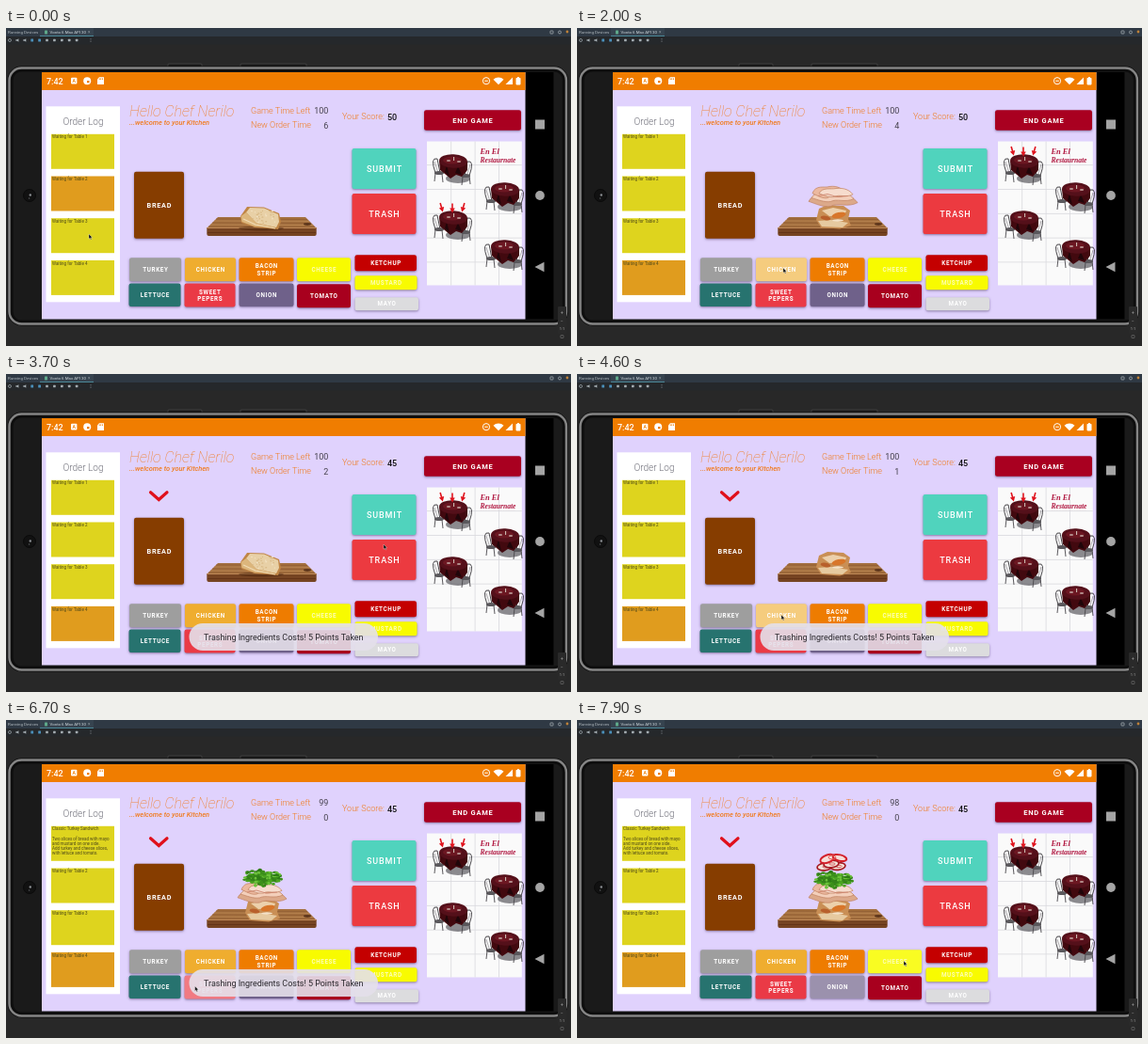
An HTML page with a canvas that plays this animation: 600 by 338 pixels, repeating every 8 s.

```html
<!DOCTYPE html>
<html lang="en">
<head>
<meta charset="utf-8">
<title>Kitchen game</title>
<style>
html, body { margin: 0; width: 100%; height: 100%; overflow: hidden; background: #282828; }
canvas { display: block; width: 600px; height: 338px; }
</style>
</head>
<body>
<canvas id="stage"></canvas>
<script>
const LOOP = 8000;
const TRASHED = 3050;
const canvas = document.getElementById('stage');
const c = canvas.getContext('2d');
const ratio = window.devicePixelRatio || 1;
canvas.width = 600 * ratio;
canvas.height = 338 * ratio;

// ---------- helpers ----------
function rect(x, y, w, h, fill) {
  c.fillStyle = fill;
  c.fillRect(x, y, w, h);
}
function round(x, y, w, h, r, fill, line, width = 1) {
  c.beginPath();
  c.roundRect(x, y, w, h, r);
  if (fill) { c.fillStyle = fill; c.fill(); }
  if (line) { c.strokeStyle = line; c.lineWidth = width; c.stroke(); }
}
function oval(x, y, rx, ry, fill, line, width = 1, turn = 0) {
  c.beginPath();
  c.ellipse(x, y, rx, ry, turn, 0, Math.PI * 2);
  if (fill) { c.fillStyle = fill; c.fill(); }
  if (line) { c.strokeStyle = line; c.lineWidth = width; c.stroke(); }
}
function shape(points, fill, line, width = 1, open = false) {
  c.beginPath();
  for (let i = 0; i < points.length; i += 2) c.lineTo(points[i], points[i + 1]);
  if (!open) c.closePath();
  if (fill) { c.fillStyle = fill; c.fill(); }
  if (line) { c.strokeStyle = line; c.lineWidth = width; c.stroke(); }
}
function text(str, x, y, size, color, o = {}) {
  c.font = `${o.style || ''} ${o.weight || 400} ${size}px ${o.family || 'Roboto, sans-serif'}`;
  c.letterSpacing = (o.gap || 0) + 'px';
  c.textAlign = o.align || 'left';
  c.fillStyle = color;
  c.fillText(str, x + (o.align === 'center' ? (o.gap || 0) / 2 : 0), y);
}
function mix(a, b, k) {
  const part = (s, i) => parseInt(s.slice(i, i + 2), 16);
  const v = [1, 3, 5].map(i => Math.round(part(a, i) + (part(b, i) - part(a, i)) * k));
  return `rgb(${v})`;
}
const clamp = v => Math.max(0, Math.min(1, v));
const ease = k => k * k * (3 - 2 * k);
function noise(seed) {
  return () => (seed = (seed * 16807) % 2147483647) / 2147483647;
}

// ---------- window and phone ----------
function drawWindow() {
  rect(0, 0, 600, 338, '#282828');
  rect(0, 0, 600, 9, '#2f3944');
  rect(36, 0, 57, 9, '#36434f');
  rect(36, 8, 57, 1, '#4a8797');
  rect(0, 9, 600, 8.5, '#25282b');
  text('Running Devices', 2, 6, 4.4, '#b4bcc2');
  round(41, 2.5, 3, 4, .6, '#5fa98a');
  text('Vonto 6 Max API 30', 46.5, 6, 4.4, '#cbd3d8');
  text('×', 87, 6, 4.6, '#9aa4a9');
  for (let i = 0; i < 11; i++) {
    const x = 4 + i * 7.9;
    if (i === 0) oval(x, 13, 1.5, 1.5, null, '#a4adb2', .7);
    else if (i === 3 || i === 4) round(x - 1.4, 11.6, 2.8, 2.8, .5, '#4b8fba');
    else if (i === 1 || i === 2) shape([x - 1.5, 12.3, x, 12.3, x + 1.5, 11.2, x + 1.5, 14.8, x, 13.7, x - 1.5, 13.7], '#a4adb2');
    else if (i === 10) for (let k = 0; k < 3; k++) oval(x + 7, 11.5 + k * 1.5, .45, .45, '#a4adb2');
    else round(x - 1.3, 11.7, 2.6, 2.6, .5, '#a4adb2');
  }
  round(578, 3, 3, 3, .4, null, '#a4adb2', .8);
  oval(588, 4.5, 1.5, 1.5, null, '#a4adb2', .8);
  oval(596, 4, 1.4, 1.4, '#c08238');

  round(172, 38, 36, 5, 1, '#1b1b1b', '#4c4c4c', .7);
  round(249, 38, 70, 5, 1, '#1b1b1b', '#4c4c4c', .7);
  round(1.5, 40.5, 595.5, 276, 15, '#0e0e0e');
  round(3.5, 42.5, 591.5, 272, 13, '#1a1a1a', '#858585', 2.4);
  round(6.5, 45.3, 585.5, 266.4, 10, null, '#0d0d0d', 2.2);
  rect(551.5, 47, 30, 262.5, '#000');
  oval(25, 178, 6.5, 6.5, '#111', '#0a0a0a', 1);
  oval(25.8, 177.5, 1.2, 1.2, '#8a8e92');
  oval(24.6, 181, .8, .8, '#55595c');

  rect(562, 97.5, 10, 10, '#a4a4a4');
  oval(567, 178, 4.9, 4.9, '#a4a4a4');
  shape([561.5, 254, 571.5, 248.8, 571.5, 259.2], '#a4a4a4');

  round(586, 296, 9, 29, 1, '#2a2a2a');
  text('+', 590.5, 304, 5, '#a9a9a9', { align: 'center' });
  text('−', 590.5, 313, 5, '#a9a9a9', { align: 'center' });
  text('1:1', 590.5, 321, 4, '#a9a9a9', { align: 'center' });
  round(589, 326.5, 3, 3, .3, null, '#777', .6);
}

function drawStatus() {
  rect(38, 47, 513.5, 262.5, '#e0d2fd');
  rect(38, 47, 513.5, 19, '#f07d00');
  text('7:42', 43, 60, 9, '#fff', { weight: 500 });
  round(69, 52.8, 6.4, 6.6, 1, '#fff');
  text('A', 72.2, 58.2, 5, '#f07d00', { weight: 700, align: 'center' });
  oval(86.2, 56.2, 4, 4, '#fff');
  rect(86, 56, 2.5, 2.3, '#f07d00');
  shape([97, 54.5, 99, 52.3, 104, 52.3, 104, 60, 97, 60], '#fff');
  for (let i = 0; i < 3; i++) rect(98.8 + i * 1.6, 53.4, .8, 1.6, '#f07d00');
  oval(510, 56.2, 3.6, 3.6, null, '#fff', 1);
  rect(508.2, 55.7, 3.6, 1, '#fff');
  c.beginPath();
  c.moveTo(523, 60.2);
  c.arc(523, 60.2, 7.8, Math.PI * 1.25, Math.PI * 1.75);
  c.fillStyle = '#fff';
  c.fill();
  shape([530.5, 60, 538, 60, 538, 52.4], '#fff');
  round(541.5, 53, 5, 7.4, .8, '#fff');
  rect(543, 52, 2, 1.5, '#fff');
}

// ---------- app ----------
const recipe = ['Classic Turkey Sandwich', '', 'Two slices of bread with mayo',
  'and mustard on one side.', 'Add turkey and cheese slices,', 'with lettuce and tomato.'];

function drawOrders(t) {
  const chosen = t < 200 ? 2 : t < 550 ? 3 : 4;
  rect(42.5, 83.3, 78.5, 208, '#ffffff');
  text('Order Log', 82, 102.6, 10, '#70707a', { weight: 300, align: 'center' });
  for (let n = 1; n <= 4; n++) {
    const y = 112.8 + (n - 1) * 44.7;
    rect(48, y, 67, 37, n === chosen ? '#e09c1e' : '#ded41e');
    if (n === 1 && t >= 6400) {
      recipe.forEach((line, i) => text(line, 49, y + 4.6 + i * 5.15, 4.5, '#4c4718'));
    } else {
      text('Waiting for Table ' + n, 49, y + 4.6, 4.5, '#4c4718');
    }
  }
  return chosen;
}

function drawHeader(t) {
  const ticks = Math.max(0, Math.floor((t + 600) / 1000));
  const orange = '#f07a1c';
  text('Hello Chef Nerilo', 131, 94.2, 16, orange, { weight: 100, style: 'italic' });
  text('...welcome to your Kitchen', 131, 102.5, 7.4, orange, { weight: 500, style: 'italic' });
  text('Game Time Left', 260, 91, 9, orange, { weight: 300 });
  text('New Order Time', 260, 106, 9, orange, { weight: 300 });
  text('Your Score:', 357, 97.3, 9, orange, { weight: 300 });
  text(100 - Math.max(0, ticks - 6), 342.3, 91.2, 9, '#46424e', { align: 'right' });
  text(Math.max(0, 6 - ticks), 342.3, 106.7, 9, '#46424e', { align: 'right' });
  text(t < TRASHED ? 50 : 45, 405, 97.5, 9, '#111', { weight: 500 });
}

const buttons = [
  // label, x, y, width, height, colour, type size
  ['END GAME', 444, 87.3, 103, 21.5, '#a90020', 7.5],
  ['SUBMIT', 367.5, 128, 68, 43, '#50d3bd', 9],
  ['TRASH', 367.5, 176, 68, 43, '#ec3a40', 9],
  ['BREAD', 136, 152.8, 53, 71, '#863d00', 7.3],
  ['TURKEY', 131, 244.3, 55, 25, '#9e9e9e', 6.3],
  ['CHICKEN', 190, 244.3, 54, 25, '#efad2f', 6.3],
  ['BACON STRIP', 247.5, 244.3, 58, 25, '#ee7c00', 6.3],
  ['CHEESE', 309, 244.3, 57, 25, '#f8fb00', 6.3],
  ['LETTUCE', 130.5, 271.5, 55, 24.5, '#27736f', 6.3],
  ['SWEET PEPERS', 189.5, 271.5, 54, 25, '#ea3a46', 6.3],
  ['ONION', 247.5, 271.5, 58, 24.5, '#6f618a', 6.3],
  ['TOMATO', 309, 272.3, 57, 25, '#a8001e', 6.3],
  ['KETCHUP', 370.5, 241.3, 65.5, 17, '#c40000', 6.3],
  ['MUSTARD', 370.5, 263.3, 66, 15, '#f8fb00', 6.3],
  ['MAYO', 370.5, 286.2, 67.5, 14, '#dcdcde', 6.3]
];
const presses = [['TURKEY', 1250], ['CHICKEN', 1900], ['TRASH', TRASHED - 50], ['CHICKEN', 4450],
  ['TURKEY', 5100], ['LETTUCE', 5500], ['SWEET PEPERS', 6650], ['ONION', 7450], ['CHEESE', 7880]];

function glow(label, t) {
  let g = 0;
  for (const [name, at] of presses) {
    const age = t - at;
    if (name === label && age >= 0) g = Math.max(g, Math.min(age / 60, 1) * clamp((650 - age) / 250) * .38);
  }
  return g;
}
function drawButtons(t) {
  for (const [label, x, y, w, h, color, size] of buttons) {
    c.save();
    c.shadowColor = 'rgba(50,30,80,.5)';
    c.shadowBlur = 2.5 * ratio;
    c.shadowOffsetY = 1 * ratio;
    round(x, y, w, h, 2.2, mix(color, '#ffffff', glow(label, t)));
    c.restore();
    const lines = size === 6.3 ? label.split(' ') : [label];
    const o = { weight: size === 9 ? 500 : 700, gap: size / 10, align: 'center' };
    const ink = color === '#f8fb00' ? '#fdfdb8' : '#ffffff';
    lines.forEach((line, i) => {
      const dy = (i - (lines.length - 1) / 2) * 7.4;
      text(line, x + w / 2, y + h / 2 + size * .36 + dy, size, ink, o);
    });
  }
}

// ---------- restaurant ----------
const tables = [[528, 240], [473, 209], [528, 179], [473, 149]];

function chair(x, y, dir) {
  const ink = '#4a484c';
  c.beginPath();
  c.moveTo(x, y + 4);
  c.quadraticCurveTo(x - dir * 6, y - 13, x + dir * 2, y - 11);
  c.lineTo(x + dir * 5, y + 4);
  c.strokeStyle = ink;
  c.lineWidth = 1;
  c.stroke();
  shape([x - dir, y - 8, x + dir * 2.5, y + 3], null, '#77757a', .6, true);
  oval(x + dir * 4, y + 4, 5, 2, '#5a585c');
  shape([x, y + 4, x - dir, y + 13], null, ink, .9, true);
  shape([x + dir * 7, y + 5, x + dir * 8, y + 14], null, ink, .9, true);
}
function drawTable(x, y) {
  oval(x + 7, y + 11, 13, 5, 'rgba(80,78,84,.65)');
  chair(x - 17, y + 1, 1);
  chair(x + 19, y + 4, -1);
  const cx = x + 2, cy = y - 2;
  shape([cx - 15, cy - 6, cx + 15, cy - 5, cx + 15, cy + 4, cx + 9, cy + 11, cx + 3, cy + 9,
    cx - 3, cy + 13, cx - 9, cy + 8, cx - 14, cy + 4], '#42090f');
  shape([cx - 7, cy - 1, cx - 4, cy + 11, cx - 9, cy + 6], '#20060a');
  shape([cx + 5, cy, cx + 9, cy + 9, cx + 2, cy + 7], '#20060a');
  oval(cx, cy - 5.5, 15, 7.3, '#54101a', null, 1, .05);
  oval(cx - 1, cy - 6.5, 10, 4, '#6c1722');
  oval(cx - 5, cy - 6, 2.2, .9, '#b59390');
  oval(cx + 6, cy - 5, 2.2, .9, '#b59390');
  rect(cx, cy - 10, 1.1, 4, '#c9b8ae');
}
function arrow(x, y, turn) {
  c.save();
  c.translate(x, y);
  c.rotate(turn);
  shape([-.8, -5, .8, -5, .8, 0, 2.8, 0, 0, 5, -2.8, 0, -.8, 0], '#e0141e');
  c.restore();
}
function drawRestaurant(chosen) {
  rect(447, 120.5, 100.8, 153, '#fafafa');
  for (let i = 0; i < 3; i++) rect(472.3 + i * 25.4, 120.5, .8, 153, '#d9d9dd');
  for (let i = 0; i < 5; i++) rect(447, 145.3 + i * 25.8, 100.8, .8, '#d9d9dd');
  for (const [x, y] of tables) drawTable(x, y);
  const script = { style: 'italic', weight: 700, family: '"Liberation Serif", serif' };
  text('En El', 503.5, 134, 8.4, '#b01640', script);
  text('Restaurnate', 503.5, 143, 7.6, '#b01640', script);
  const [x, y] = tables[chosen - 1];
  for (let i = -1; i <= 1; i++) arrow(x + 1 + i * 11.5, y - 17.5 - Math.abs(i) * .7, i * .28);
}

// ---------- sandwich ----------
function drawBoard() {
  shape([225, 201, 318, 201, 329.5, 212.5, 213.5, 212.5], '#a4703f');
  for (let i = 0; i < 5; i++) {
    shape([223 - i * 2, 203 + i * 2, 320 + i * 2, 203.5 + i * 2], null, i % 2 ? '#ba8753' : '#8f5b32', .7, true);
  }
  round(213.3, 212, 116.4, 9, [0, 0, 2, 2], '#764422');
  rect(213.3, 212, 116.4, 1, '#c08a58');
  rect(214, 217, 115, .7, '#5c2f14');
  oval(320, 208.5, 4, 1.4, '#5f371c');
}
function drawBread() {
  oval(271, 213, 24, 2.5, 'rgba(60,25,5,.4)');
  shape([249, 200, 256, 190, 274, 190.5, 290, 197, 292, 206, 289, 214, 264, 212, 250, 207], '#c08545');
  shape([255, 196, 259, 191, 274, 191.5, 289, 198, 290, 206, 287, 212, 266, 207.5], '#e8d0a6');
  shape([249.5, 200, 255, 196, 266, 207.5, 287, 212, 264, 211, 250.5, 206], '#dcb67c');
  shape([252, 203, 265, 209, 286, 213], null, '#f1dcb6', 1.1, true);
  const rnd = noise(31);
  for (let i = 0; i < 34; i++) oval(261 + rnd() * 25, 193.5 + rnd() * 14, .5 + rnd() * .8, .5, i % 3 ? '#d2b07a' : '#f6e8cc');
}
function drawChicken(y) {
  shape([257, y - 8, 266, y - 12, 283, y - 11, 290, y - 6, 288, y + 3, 291, y + 10, 279, y + 13.5, 259, y + 12, 254, y + 4], '#c98f55');
  shape([260, y - 6, 272, y - 9, 286, y - 6, 284, y - 1, 268, y], '#ecd0ab');
  shape([256, y + 5, 270, y + 4, 288, y + 7, 282, y + 12, 260, y + 11], '#e6caa0');
  oval(278, y - 1, 7.5, 3, '#d8762a', null, 1, -.2);
  oval(264, y + 2, 5.5, 2.2, '#b8602c', null, 1, .2);
  oval(277, y + 4.5, 6, 1.2, '#f4e2c8');
}
function slice(x, y, w, h, fill) {
  c.beginPath();
  c.moveTo(x, y + h * .6);
  c.bezierCurveTo(x + w * .1, y - h * .2, x + w * .35, y + h * .15, x + w * .5, y);
  c.bezierCurveTo(x + w * .75, y - h * .1, x + w * .9, y + h * .2, x + w, y + h * .7);
  c.bezierCurveTo(x + w * .8, y + h * 1.15, x + w * .6, y + h * .65, x + w * .45, y + h);
  c.bezierCurveTo(x + w * .3, y + h * 1.1, x + w * .15, y + h * .8, x, y + h * .6);
  c.fillStyle = fill;
  c.fill();
  c.strokeStyle = '#c08260';
  c.lineWidth = .7;
  c.stroke();
}
function drawTurkey(y) {
  slice(246, y + 8, 52, 13, '#dca98a');
  slice(249, y + 6, 45, 10, '#f3cfba');
  slice(250, y, 36, 12, '#ecb9a0');
  slice(257, y + 2, 36, 9, '#f6dccd');
  shape([256, y + 10, 266, y + 8, 276, y + 11, 288, y + 10], null, '#cf8670', .9, true);
}
function drawLettuce(y) {
  const rnd = noise(77);
  const greens = ['#2e7d16', '#4aa421', '#6cc23a', '#3c8f1b'];
  oval(271, y + 10, 17, 6, '#35831a');
  for (let i = 0; i < 90; i++) {
    const a = rnd() * Math.PI * 2, r = Math.sqrt(rnd());
    oval(272 + Math.cos(a) * r * 21, y + 9.5 + Math.sin(a) * r * 9, 1.2 + rnd() * 1.5, .8 + rnd(), greens[i % 4]);
  }
}
function drawPeppers(y) {
  for (const [x, d] of [[263, 4], [277, 3.5], [270, 1]]) {
    oval(x, y + d, 8, 3.8, '#f4e3da', '#a51820', 1.7, -.1);
    oval(x + 1, y + d, 3.2, 1.2, null, '#c9464a', .8);
  }
}
function drawRings(y) {
  oval(266, y + 5.5, 8, 4, '#f6dfd8', '#d3202a', 2, -.35);
  oval(279, y + 4.5, 7.5, 3.2, '#f6dfd8', '#d3202a', 2, .25);
  oval(271, y + 4, 4, 2, null, '#e65650', 1);
}
function drawSandwich(t) {
  drawBoard();
  const first = t >= 1300 && t < TRASHED;
  if (t < 1950 || (t >= TRASHED && t < 4500)) drawBread();
  if (first) {
    if (t >= 1950) drawChicken(200);
    drawTurkey(t >= 1950 ? 168.5 : 176);
  }
  if (t >= 4500) drawChicken(201);
  if (t >= 5150) drawTurkey(t >= 5550 ? 173 : 168.5);
  if (t >= 5550) drawLettuce(t >= 6800 ? 160 : 158);
  if (t >= 6800) drawPeppers(152);
  if (t >= 7500) drawRings(142);
}

// ---------- overlays ----------
function drawToast(t) {
  const show = clamp((t - TRASHED - 50) / 250) * clamp((7150 - t) / 250);
  if (!show) return;
  c.save();
  c.globalAlpha = show;
  round(194.5, 265, 200.5, 29, 14.5, 'rgba(229,224,234,.9)');
  text('Trashing Ingredients Costs! 5 Points Taken', 294.8, 282.7, 8.95, '#29272c', { align: 'center' });
  c.restore();
}

const path = [[0, 88, 219], [100, 88, 220], [500, 88, 266], [800, 88, 266], [1200, 158, 255],
  [1450, 158, 255], [1850, 219, 255], [2200, 219, 255], [2950, 401, 181], [3800, 401, 181],
  [4350, 217, 256], [4600, 217, 256], [5000, 159, 256], [5150, 159, 256], [5400, 160, 280],
  [6200, 160, 280], [6650, 200, 283], [6900, 206, 283], [7350, 276, 282], [7550, 276, 282], [7880, 347, 256]];

function drawCursor(t) {
  let i = 0;
  while (i < path.length - 2 && t >= path[i + 1][0]) i++;
  const [t0, x0, y0] = path[i], [t1, x1, y1] = path[i + 1];
  const k = ease(clamp((t - t0) / (t1 - t0)));
  const x = x0 + (x1 - x0) * k, y = y0 + (y1 - y0) * k;
  shape([x, y, x, y + 5.2, x + 1.2, y + 4.1, x + 2, y + 6, x + 2.9, y + 5.6, x + 2.1, y + 3.8, x + 3.7, y + 3.7],
    '#0a0a0a', 'rgba(255,255,255,.75)', .45);
}

function frame(now) {
  const t = now % LOOP;
  c.setTransform(ratio, 0, 0, ratio, 0, 0);
  drawWindow();
  drawStatus();
  const chosen = drawOrders(t);
  drawHeader(t);
  drawButtons(t);
  drawRestaurant(chosen);
  drawSandwich(t);
  if (t >= TRASHED) {
    c.lineCap = 'round';
    shape([153.5, 125.8, 162.3, 133.5, 171, 125.8], null, '#e0101c', 3.2, true);
    c.lineCap = 'butt';
  }
  drawToast(t);
  drawCursor(t);
  requestAnimationFrame(frame);
}
requestAnimationFrame(frame);
</script>
</body>
</html>
```
